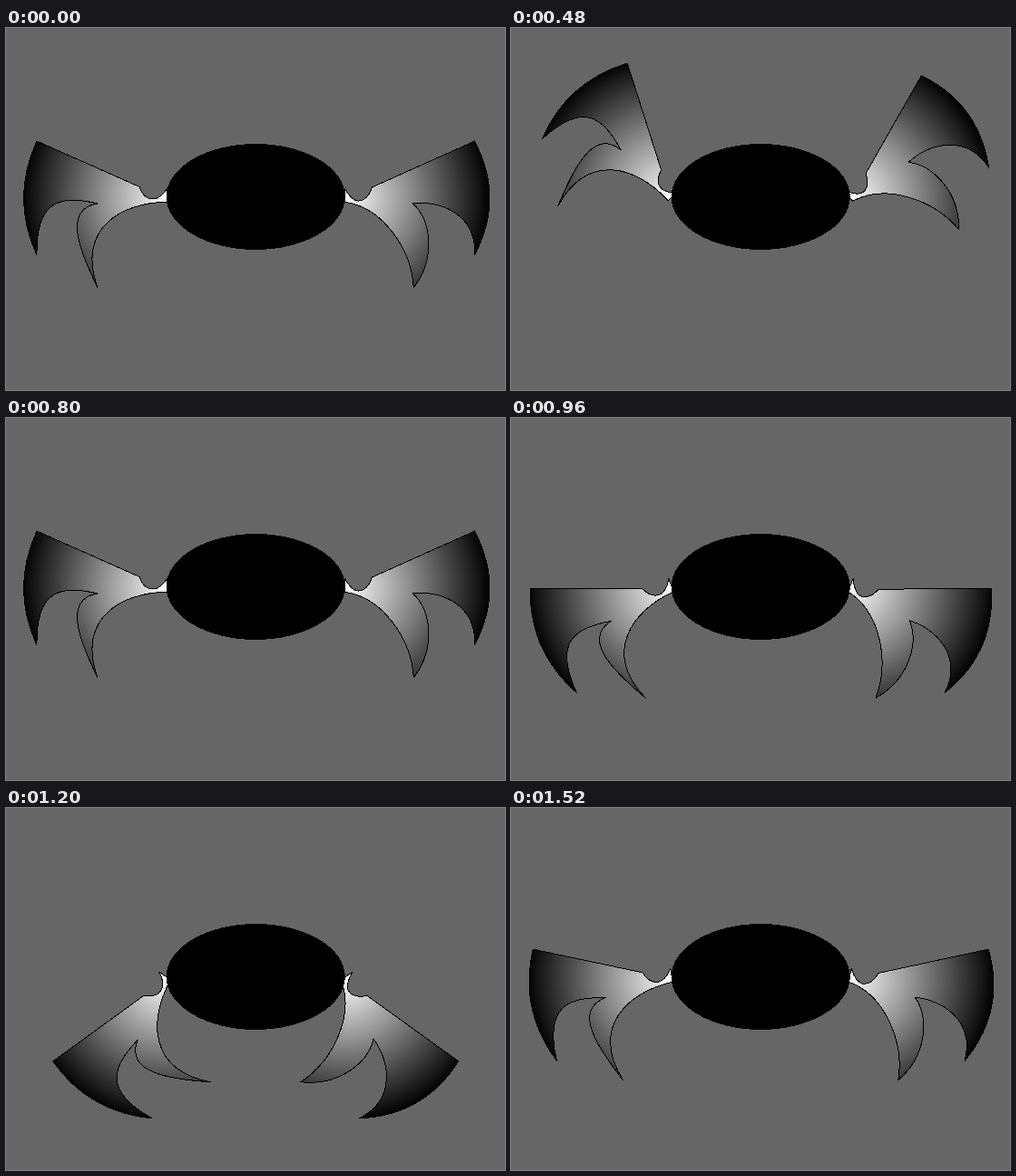
An HTML page for the animation above (1600 ms loop, 550x400 px).

```html
<!DOCTYPE html>
<html lang="en">
<head>
<meta charset="utf-8">
<title>Flapping wings</title>
<style>
  html, body { margin: 0; width: 100%; height: 100%; overflow: hidden; background: #666; }
  svg { display: block; width: 550px; height: 400px; shape-rendering: crispEdges; }
  .wing { stroke: #000; stroke-width: 1; stroke-linejoin: round; }
</style>
</head>
<body>
<svg viewBox="0 0 550 400">
  <defs>
    <radialGradient id="shadeL" gradientUnits="userSpaceOnUse" cx="177" cy="187" r="160">
      <stop offset="0" stop-color="#fff"/>
      <stop offset="1" stop-color="#000"/>
    </radialGradient>
    <radialGradient id="shadeR" href="#shadeL" cx="373.5"/>
  </defs>
  <path id="left" class="wing" fill="url(#shadeL)" d="M34 125 L147 175.5 C150 184 155 189 162 189 C169 189 174 183 178 177
    L177 192.3 C126 193 78 222 101 287 C83 250 61 200 101 194 C60 184 33 190 34 251 Q5 188 34 125Z"/>
  <path id="right" class="wing" fill="url(#shadeR)" d="M516.5 125 L403.5 176 C400 186 395 191 388.5 191 C382 191 377 184 373 177
    L373.5 192.3 C415 198 447 244 449.3 287 C474 255 469 212 448.5 194 C474 190 519 203 516.5 251 Q549.5 188 516.5 125Z"/>
  <ellipse cx="275.2" cy="186.5" rx="98.6" ry="58.5"/>
</svg>
<script>
  const STEP = 80, QUARTER = 5, STEPS = 20;
  const left = document.getElementById('left');
  const right = document.getElementById('right');

  // Triangle wave: 0, 1, 0, -1, 0 over one loop.
  function wave(n) {
    const t = n / QUARTER;
    return t < 1 ? t : t < 3 ? 2 - t : t - 4;
  }

  const turn = (wing, deg, x) => wing.setAttribute('transform', `rotate(${deg} ${x} 187)`);

  function draw(now) {
    const w = wave(Math.floor(now / STEP) % STEPS);
    turn(left, w * (w > 0 ? 60.4 : 60), 177);
    turn(right, -w * (w > 0 ? 45.2 : 60), 373.5);
    requestAnimationFrame(draw);
  }
  draw(performance.now());
</script>
</body>
</html>
```
